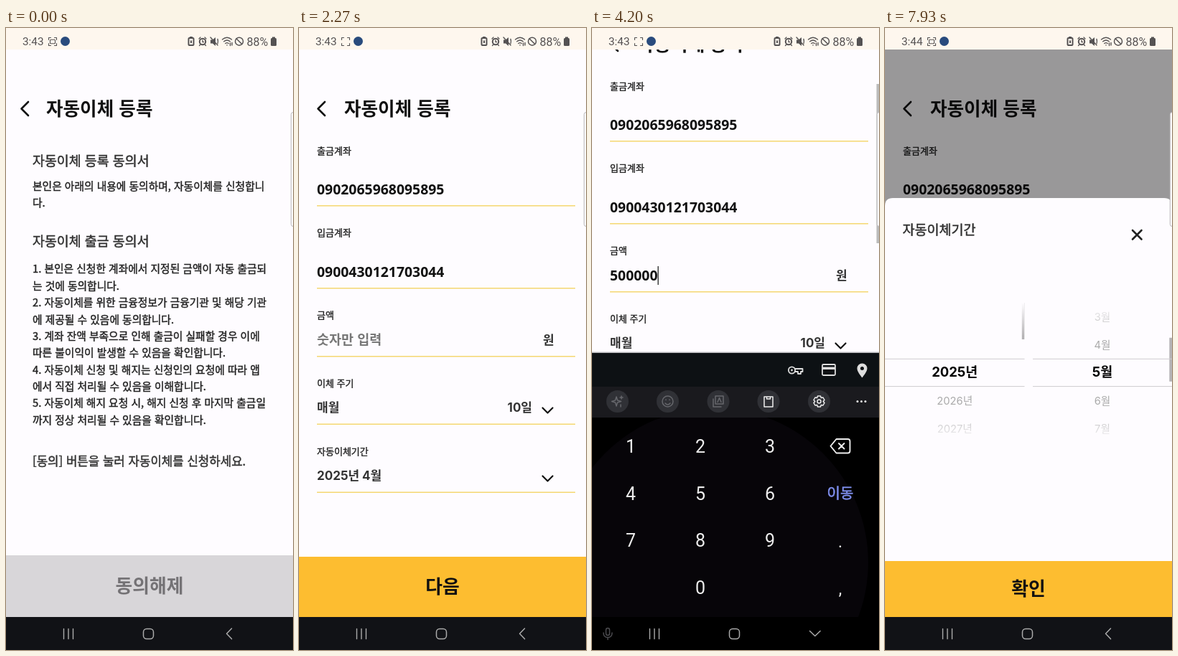
These frames come from a looping animation (400 px wide and 867 px high, 8000 ms). An HTML page:

```html
<!DOCTYPE html>
<html lang="ko">
<head>
<meta charset="utf-8">
<style>
  html, body { margin: 0; width: 100%; height: 100%; overflow: hidden; background: #fefcff; }
  svg { display: block; width: 100vw; height: 100vh; }
  text { font-family: "Noto Sans CJK KR", "Noto Sans CJK", "Noto Sans", sans-serif; }
  .num { font-family: "Noto Sans", sans-serif; }
  .mix { font-family: Inter, "Noto Sans CJK KR", "Noto Sans CJK", sans-serif; }
  .ui { font-family: Roboto, sans-serif; }
  .item { font-size: 14.7px; fill: #aaa; }
  .item.on { font-size: 18.4px; font-weight: 700; fill: #000; }
  .line { fill: none; stroke-linecap: round; stroke-linejoin: round; }
</style>
</head>
<body>
<svg id="stage" viewBox="0 0 400 867" preserveAspectRatio="none"></svg>
<script>
const YELLOW = '#fdbd30', PAPER = '#fefcff', ROW = 39, BOTTOM = 821;

// y is the visual middle of the text; a thin outline stands in for the missing medium weight
const text = (x, y, size, str, { fill = '#222', weight = 400, anchor = 'start', cls = '', id = '' } = {}) =>
  `<text id="${id}" class="${cls}" x="${x}" y="${y + size * 0.37}" font-size="${size}" font-weight="${weight}" fill="${fill}" text-anchor="${anchor}"` +
  (weight === 500 ? ` stroke="${fill}" stroke-width="${size * 0.028}"` : '') + `>${str}</text>`;
const rect = (x, y, w, h, fill, extra = '') =>
  `<rect x="${x}" y="${y}" width="${w}" height="${h}" fill="${fill}" ${extra}/>`;
const path = (d, stroke, width = 1.5, extra = '') =>
  `<path class="line" d="${d}" stroke="${stroke}" stroke-width="${width}" ${extra}/>`;
const group = (id, body, extra = '') => `<g id="${id}" ${extra}>${body}</g>`;
const mid = { anchor: 'middle' };

const header = (x, titleX) =>
  path(`M${x + 10} 103l-9.5 9.5l9.5 9.5`, '#111', 2.6) +
  text(titleX, 112.5, 25.6, '자동이체 등록', { weight: 700, fill: '#111' });
const button = (y, label, fill = YELLOW, color = '#111') =>
  rect(0, y, 400, BOTTOM - y, fill) +
  text(200, (y + BOTTOM) / 2 - 0.5, 25.8, label, { ...mid, weight: 700, fill: color });

const terms = [
  '1. 본인은 신청한 계좌에서 지정된 금액이 자동 출금되', '는 것에 동의합니다.',
  '2. 자동이체를 위한 금융정보가 금융기관 및 해당 기관', '에 제공될 수 있음에 동의합니다.',
  '3. 계좌 잔액 부족으로 인해 출금이 실패할 경우 이에', '따른 불이익이 발생할 수 있음을 확인합니다.',
  '4. 자동이체 신청 및 해지는 신청인의 요청에 따라 앱', '에서 직접 처리될 수 있음을 이해합니다.',
  '5. 자동이체 해지 요청 시, 해지 신청 후 마지막 출금일', '까지 정상 처리될 수 있음을 확인합니다.'
];
const body = (y, str) => text(37, y, 14.75, str, { weight: 500 });
const agreement = group('agreement',
  header(21, 56) +
  text(37, 185.5, 18.4, '자동이체 등록 동의서', { weight: 500, fill: '#333' }) +
  body(221, '본인은 아래의 내용에 동의하며, 자동이체를 신청합니') + body(244, '다.') +
  text(37, 297, 18.4, '자동이체 출금 동의서', { weight: 500, fill: '#333' }) +
  terms.map((s, i) => body(336 + i * 23.35, s)).join('') +
  text(37, 604, 16.8, '[동의] 버튼을 눌러 자동이체를 신청하세요.', { weight: 500, fill: '#333' }) +
  button(735, '동의해제', '#d8d6d9', '#747275'));

const notes = ['자동이체 수수료는 무료입니다.', '당행/적금 자동이체는 휴일에도 출금 처리 됩니다.', '자동이체 등록/변경/해지 신청은 당일 처리가 불가합니다.'];
const consent = group('consent',
  header(26, 61) +
  text(200, 205, 14.7, '자동이체를 등록하시려면', { ...mid, weight: 500 }) +
  text(200, 250, 14.7, '아래 내용을 읽고 동의해주세요.', { ...mid, weight: 500 }) +
  rect(0, 301.5, 400, 436, '#efeef1') + rect(38.5, 321, 323.5, 56, PAPER) +
  rect(54.5, 341, 16.5, 16, 'none', 'stroke="#222" stroke-width="1.4"') +
  path('M57.5 348.5l4.5 5l7.5-10', '#222', 1.8) +
  text(86, 349.5, 14.8, '자동이체 등록 동의서', { weight: 500 }) +
  path('M336.5 343.5l6 6l-6 6', '#111', 2.4) +
  notes.map((s, i) => text(71, 409 + i * 15.6, 11.04, s, { weight: 500, fill: '#777' })).join('') +
  button(737, '다음'));

const field = (y, label, lineY) =>
  text(25, y, 13, label, { weight: 500 }) + rect(25, lineY - 0.5, 360, 1.5, '#f5d871');
const account = (y, str, id = '') => text(25, y, 19.4, str, { cls: 'num', weight: 700, fill: '#111', id });
const strong = (x, y, str, anchor = 'start') => text(x, y, 17, str, { cls: 'mix', weight: 700, fill: '#333', anchor });
const chevron = y => path(`M339.5 ${y - 3.5}l7 7l7-7`, '#111', 2.2);
const form = group('form', group('formBody',
  header(26, 63) +
  field(171, '출금계좌', 247.5) + account(225, '0902065968095895') +
  field(285.5, '입금계좌', 362.5) + account(340, '0900430121703044') +
  field(400, '금액', 457.5) + account(434.5, '', 'amount') +
  text(25, 434.5, 18.5, '숫자만 입력', { weight: 700, fill: '#777', id: 'hint' }) +
  rect(92, 422, 1.2, 26, '#111', 'id="caret"') + strong(340, 434.5, '원') +
  field(495, '이체 주기', 552) + strong(25, 528.5, '매월') + strong(325, 528.5, '10일', 'end') + chevron(533) +
  field(590, '자동이체기간', 647) + strong(25, 623.5, '2025년 4월') + chevron(628) +
  button(737, '다음')) +
  rect(396.5, 78, 3.5, 222, '#bbb', 'id="formThumb"'));

const wheel = (id, x, width, top, labels, thumbHeight) => {
  const cx = x + width / 2, center = top + 97.5;
  return `<clipPath id="${id}Clip">${rect(x, top, width, 195, '#000')}</clipPath>` +
    group(id, `<g>${labels.map((s, i) =>
      `<text class="mix item" text-anchor="middle" x="${cx}" y="${center + i * ROW + 5.5}">${s}</text>`).join('')}</g>` +
      rect(x + width - 3.7, top, 3.7, thumbHeight, '#b5b3b5', 'class="thumb"') +
      rect(x, top, width, 47, 'url(#fadeDown)') + rect(x, top + 148, width, 47, 'url(#fadeUp)'),
      `clip-path="url(#${id}Clip)"`) +
    rect(x, center - 19.7, width, 1, '#cfcdd0') + rect(x, center + 18.6, width, 1, '#cfcdd0');
};
const sheet = (id, title, content) => group(id,
  `<path d="M0 750V248q0-11 11-11H389q11 0 11 11V750z" fill="${PAPER}"/>` +
  text(24.5, 281.5, 18.5, title, { weight: 500, fill: '#333' }) +
  path('M345 282l12.5 12.5M357.5 282l-12.5 12.5', '#222', 2.6) +
  content + button(743, '확인'));
const range = (n, start, unit) => Array.from({ length: n }, (_, i) => start + i + unit);
const daySheet = sheet('daySheet', '이체일 선택',
  text(200, 390.5, 16.7, '이체일을 선택해 주세요', { ...mid, weight: 500, fill: '#111' }) +
  text(200, 423, 11.2, '선택한 날짜가 해당 월에 없을 경우, 말일에 자동이체가 진행됩니다.', { ...mid, weight: 500, fill: '#333' }) +
  wheel('days', 0, 400, 480, range(31, 1, '일'), 28));
const periodSheet = sheet('periodSheet', '자동이체기간',
  wheel('years', 0, 194.5, 383, range(15, 2025, '년'), 51) +
  wheel('months', 206, 194, 383, range(12, 1, '월'), 61));

const keyRows = [['1', '2', '3'], ['4', '5', '6'], ['7', '8', '9'], ['', '0', '']];
const tool = (x, color, icon) => `<circle cx="${x}" cy="520.5" r="15.5" fill="#303136"/>` + path(icon, color, 1.5);
const keyboard = group('keyboard',
  rect(0, 451.5, 400, 2, '#b9b9bc') + rect(0, 453, 400, 414, '#000') +
  '<circle id="glow" cx="170" cy="745" r="215" fill="#070509"/>' +
  rect(0, 453, 400, 47, '#0d1114') + rect(0, 500, 400, 43, '#1a1a1e') +
  '<circle class="line" cx="278.5" cy="477" r="4.6" stroke="#ddd" stroke-width="1.8"/><circle cx="278.5" cy="477" r="1.4" fill="#ddd"/>' +
  path('M283 475h10.5v4h-2.5v3h-4v-3h-4', '#ddd', 1.8) +
  rect(321, 469, 18, 15, 'none', 'rx="1.5" stroke="#ddd" stroke-width="1.8"') + rect(321, 472.5, 18, 3.5, '#ddd') +
  '<path d="M376.5 487.5c-3-4-7-9-7-13a7 7 0 0 1 14 0c0 4-4 9-7 13z" fill="#ddd"/><circle cx="376.5" cy="474.5" r="2.5" fill="#0d1114"/>' +
  tool(35.5, '#66676c', 'M34 514l1.5 5l5 1.5l-5 1.5l-1.5 5l-1.5-5l-5-1.5l5-1.5zM41 513v4M39 515h4M40 525v3') +
  tool(105.5, '#66676c', 'M98 520.5a7.5 7.5 0 1 0 15 0a7.5 7.5 0 1 0-15 0M102 523q3.5 4 7 0M103 518v.5M108 518v.5') +
  tool(176, '#66676c', 'M172 513h11v11h-11zM169 517v11h11M175 521.5l2.5-6l2.5 6') +
  tool(246, '#eee', 'M240 514h12v14h-12zM243.5 514v3h5v-3') +
  tool(316.5, '#eee', 'M314.5 513h4l.8 2.5l2.7-.5l2 3.5l-1.8 2l1.8 2l-2 3.5l-2.7-.5l-.8 2.5h-4l-.8-2.5l-2.7.5l-2-3.5l1.8-2l-1.8-2l2-3.5l2.7.5zM314 520.5a2.5 2.5 0 1 0 5 0a2.5 2.5 0 1 0-5 0') +
  [370, 375.5, 381].map(x => `<circle cx="${x}" cy="520.5" r="1.5" fill="#eee"/>`).join('') +
  keyRows.map((row, r) => row.map((k, c) =>
    text(54 + c * 97, 583 + r * 65.6, 25, k, { ...mid, cls: 'ui', fill: '#eee' })).join('')).join('') +
  path('M340.5 573h16q3 0 3 3v13.5q0 3-3 3h-16l-8-9.75zM344 579l7.5 7.5M351.5 579l-7.5 7.5', '#eee', 1.9) +
  text(346, 648.5, 20, '이동', { ...mid, weight: 500, fill: '#7f8fee' }) +
  text(346, 715, 23, '.', { ...mid, cls: 'ui', fill: '#eee' }) + text(346, 781, 23, ',', { ...mid, cls: 'ui', fill: '#eee' }));

const navigation = rect(0, BOTTOM, 400, 46, '#111216', 'id="navBack"') +
  path('M80.5 837.5v14M87 837.5v14M93.5 837.5v14', '#aaa', 1.4) +
  rect(191.5, 837.5, 14, 14, 'none', 'rx="4.5" stroke="#aaa" stroke-width="1.5"') +
  path('M314.5 837l-7 7.3l7 7.3', '#aaa', 1.5, 'id="navLeft"') +
  path('M303.5 840.5l7.3 7l7.3-7', '#aaa', 1.5, 'id="navDown"') +
  path('M19.5 839a2.5 2.5 0 0 1 5 0v5a2.5 2.5 0 0 1-5 0zM16 843q0 6.5 6 6.5t6-6.5M22 849.5v3', '#4b4b4f', 1.5, 'id="mic"');

const INK = '#555253';
const status = rect(0, 0, 400, 30, '#fef7ee') +
  text(23, 18.8, 15.3, '3:43', { cls: 'ui', fill: INK, id: 'clock' }) +
  path('M62.5 13.5h-3v3M67.5 13.5h3v3M59.5 21.5v3h3M70.5 21.5v3h-3', INK, 1.1) +
  rect(61.5, 16.3, 7, 5.5, 'none', `id="recording" rx="1" stroke="${INK}" stroke-width="1.1"`) +
  '<circle cx="82.5" cy="18.5" r="6.5" fill="#294b7d"/>' +
  rect(254.5, 14, 7, 10, 'none', `rx="1" stroke="${INK}" stroke-width="2"`) + rect(256, 12, 4, 2, INK) + rect(257, 17.5, 2, 3.5, INK) +
  `<circle class="line" cx="274" cy="19" r="4.2" stroke="${INK}" stroke-width="2"/>` +
  path('M269 15l2-2M279 15l-2-2M274 17v2.5h1.5M270.5 23.5l-1 1M277.5 23.5l1 1', INK, 1.3) +
  `<path d="M285 16.5h3l4-3.5v12l-4-3.5h-3z" fill="${INK}"/>` + path('M285 13l10 11M295 15.5q1 3 0 6', INK, 1.4) +
  path('M301.5 16q6.5-5.5 13 0M303.7 18.8q4.3-3.5 8.6 0M305.8 21.5q2.2-1.8 4.4 0M308 23.8v.2M312.5 21v3.5M315 20.5v3.5', INK, 1.4) +
  `<circle class="line" cx="325" cy="18.7" r="5.5" stroke="${INK}" stroke-width="1.5"/>` + path('M321.2 15l7.6 7.5', INK, 1.5) +
  text(335.5, 18.8, 16, '88%', { cls: 'ui', fill: INK }) +
  rect(369, 14, 8, 11, INK, 'rx="1.5"') + rect(371, 12.5, 4, 2, INK);

const fade = (id, from, to) => `<linearGradient id="${id}" x1="0" y1="0" x2="0" y2="1">
  <stop offset="0" stop-color="${PAPER}" stop-opacity="${from}"/><stop offset="1" stop-color="${PAPER}" stop-opacity="${to}"/></linearGradient>`;

document.getElementById('stage').innerHTML =
  `<defs>${fade('fadeDown', 1, 0)}${fade('fadeUp', 0, 1)}</defs>` +
  rect(0, 0, 400, 867, PAPER) + agreement + consent + form +
  rect(0, 30, 400, BOTTOM - 30, '#000', 'id="dim"') + daySheet + periodSheet + keyboard + navigation + status +
  rect(397.3, 117.5, 10, 159, PAPER, 'rx="3" stroke="#b9b7ba" stroke-width="1"');

const el = id => document.getElementById(id);
const show = (id, on) => { el(id).style.display = on ? '' : 'none'; };
const shift = (id, y) => el(id).setAttribute('transform', `translate(0 ${y})`);
const ramp = (t, start, length) => Math.min(1, Math.max(0, (t - start) / length));
const smooth = x => x * x * (3 - 2 * x);
const glide = (t, start, length) => smooth(ramp(t, start, length));

function setWheel(id, position, selected, contentRows) {
  const wheelEl = el(id), rows = wheelEl.firstChild;
  rows.setAttribute('transform', `translate(0 ${-position * ROW})`);
  [...rows.children].forEach((item, i) => item.classList.toggle('on', i === selected));
  wheelEl.querySelector('.thumb').setAttribute('transform', `translate(0 ${position * 195 / (contentRows + 4)})`);
}

function draw(t) {
  show('agreement', t < 500);
  show('consent', t >= 500 && t < 1980);
  show('form', t >= 1980);

  const keys = glide(t, 2560, 260) - glide(t, 4260, 200);
  show('keyboard', keys > 0);
  shift('keyboard', 414 * (1 - keys));
  const typing = keys > 0.5;
  show('navLeft', !typing);
  show('navDown', typing);
  show('mic', typing);
  el('navBack').setAttribute('fill', typing ? '#000' : '#111216');

  const typed = '500000'.slice(0, t < 3100 ? 0 : 1 + Math.floor((t - 3100) / 125));
  el('amount').textContent = typed;
  show('hint', !typed);
  show('glow', typed);
  show('caret', typed && t < 4300);
  el('caret').setAttribute('x', 25 + (typed ? el('amount').getComputedTextLength() : 0));
  shift('formBody', -90 * (glide(t, 3840, 300) - glide(t, 4260, 200)));
  show('formThumb', t > 3840 && t < 4300);
  shift('formThumb', -48 * (1 - glide(t, 3840, 300)));

  const day = glide(t, 4500, 220) - glide(t, 5480, 220);
  const period = glide(t, 6060, 240);
  shift('daySheet', 630 * (1 - day));
  shift('periodSheet', 630 * (1 - period));
  show('daySheet', day > 0);
  show('periodSheet', period > 0);
  el('dim').setAttribute('opacity', 0.4 * Math.max(day, period));
  setWheel('days', 9 * glide(t, 4620, 340), 9, 31);
  setWheel('years', 0, 0, 15);
  setWheel('months', 3 * glide(t, 6400, 424) + glide(t, 7330, 420), t < 7560 ? 3 : 4, 12);

  const beat = t % 1000;
  show('recording', beat < 160 || beat > 700);
  el('clock').textContent = t < 5600 ? '3:43' : '3:44';
}

const begin = performance.now();
function tick() {
  draw((performance.now() - begin) % 8000);
  requestAnimationFrame(tick);
}
tick();
</script>
</body>
</html>
```
